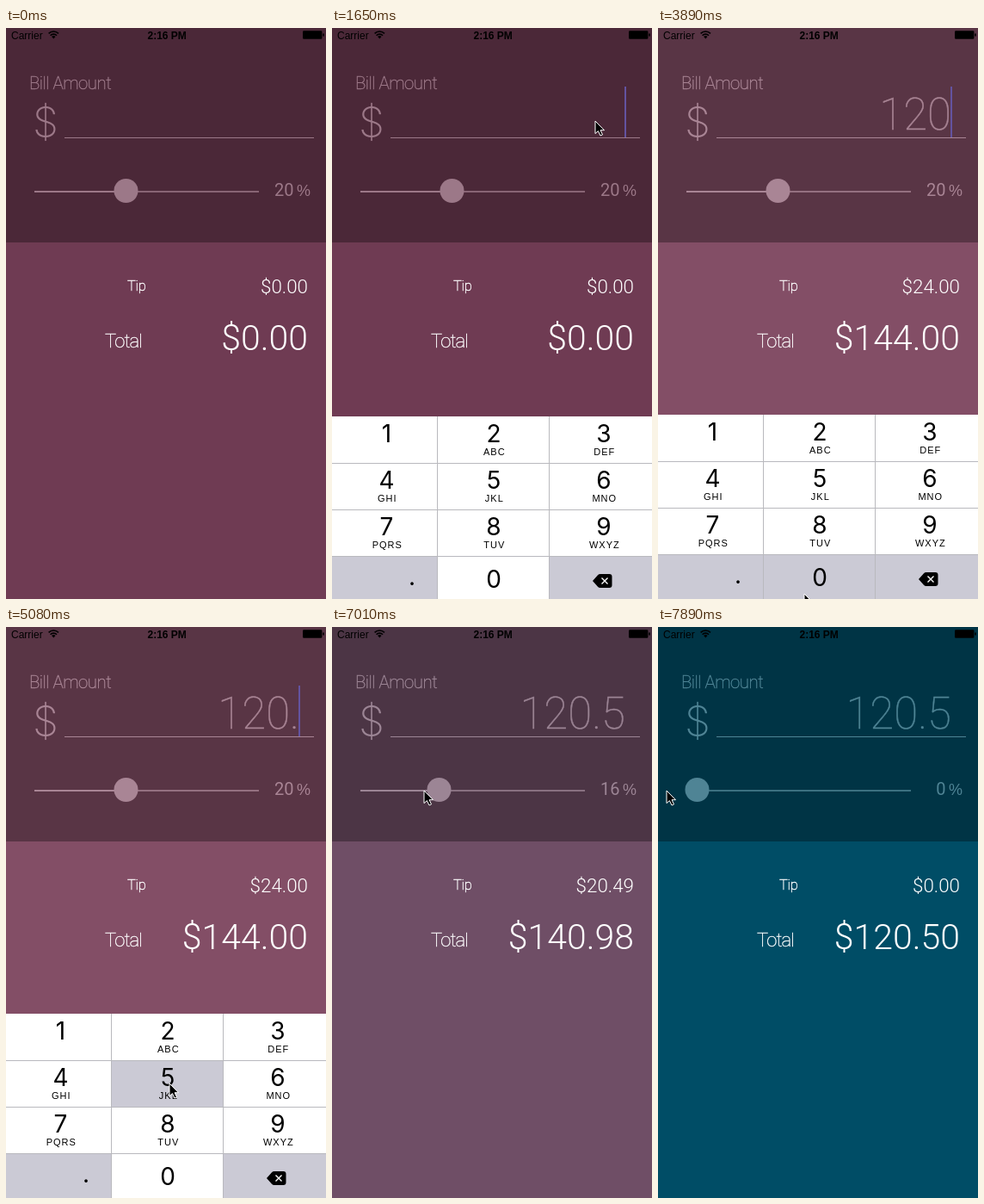
Recreate the animation shown at these times as an HTML page. Size 372 by 663 pixels, loop 8000 ms.

```html
<!DOCTYPE html>
<html lang="en">
<head>
<meta charset="utf-8">
<title>Tip calculator</title>
<style>
  html, body { margin: 0; width: 100%; height: 100%; overflow: hidden; }
  svg { display: block; }
  .back { fill: var(--back); }
  .panel { fill: var(--panel); }
  .soft { fill: var(--soft); }
  .thin, .light { font-family: Roboto, Inter, sans-serif; }
  .thin { font-weight: 100; stroke-width: .4; }
  .soft .thin { stroke: var(--soft); }
  .white .thin { stroke: #fff; }
  .light { font-weight: 300; }
  .white { fill: #fff; }
  .end { text-anchor: end; }
  .mid { text-anchor: middle; }
  .status { font: 12px "Liberation Sans", Arial, sans-serif; }
  .dollar { font: 200 48px Inter, Roboto, sans-serif; text-anchor: middle; }
  .digit { font: 28px Inter, Roboto, sans-serif; text-anchor: middle; }
  .abc { font: 11px "Liberation Sans", Arial, sans-serif; letter-spacing: 1px; text-anchor: middle; }
</style>
</head>
<body>
<svg id="stage" width="372" height="663" viewBox="0 0 372 663">
  <rect class="back" width="372" height="663"/>
  <rect class="panel" width="372" height="249"/>

  <g class="status">
    <text x="6" y="12.5">Carrier</text>
    <text x="187.2" y="12.5" class="mid" font-weight="bold">2:16 PM</text>
    <path d="M49.6 6.4a8 8 0 0 1 11.4 0M51.6 8.7a5.2 5.2 0 0 1 7.4 0" fill="none" stroke="#000" stroke-width="1.6"/>
    <path d="M55.3 12.6l-2.2-2.5a3.2 3.2 0 0 1 4.4 0z"/>
    <rect x="345" y="3.3" width="22.4" height="9.4" rx="1.2"/>
    <rect x="368.2" y="6.2" width="1.6" height="3.6" rx=".8"/>
  </g>

  <g class="soft">
    <text class="thin" x="27" y="71" font-size="20.5" letter-spacing="-.5">Bill Amount</text>
    <text class="dollar" x="46" y="126">$</text>
    <text class="thin end" id="bill" x="341" y="117.5" font-size="51"></text>
    <rect x="68" y="127" width="290" height="1"/>
    <rect x="33" y="189" width="261" height="2" opacity=".75"/>
    <rect id="fill" x="33" y="189" height="2"/>
    <circle id="thumb" cy="189" r="14"/>
    <text class="end" id="rate" x="334.5" y="195" font-size="20" font-family="Roboto, Inter, sans-serif"></text>
    <text x="338" y="194.5" font-size="18" font-family="'Liberation Sans', Arial, sans-serif">%</text>
  </g>
  <rect id="caret" x="340" y="68" width="2" height="59" fill="#6353a0"/>

  <g class="white">
    <text class="thin" x="141" y="305" font-size="16.5" letter-spacing="-.3">Tip</text>
    <text class="thin" x="115" y="371" font-size="22" letter-spacing="-.9">Total</text>
    <text class="light end" id="tip" x="351" y="307.5" font-size="22.4"></text>
    <text class="light end" id="total" x="351" y="374" font-size="41"></text>
  </g>

  <g id="pad"></g>

  <path id="pointer" d="M0 0V14.6L3.4 11.6 6 17 8.5 15.9 6.1 10.7H10.5Z"
        fill="#000" stroke="#fff" stroke-width="1" stroke-linejoin="round"/>
</svg>

<script>
const LOOP = 8000, TICK = 148.8;   // the screen refreshes once per tick
const PAD_TOP = 449, PAD_H = 216;
const SLIDE = 2.7;                 // keypad slide, in ticks
const $ = id => document.getElementById(id);
const set = (el, attrs) => { for (const k in attrs) el.setAttribute(k, attrs[k]); };

// all times below are in ticks
const typed = [[0, ''], [19, '1'], [22, '12'], [26, '120'], [31, '120.'], [35, '120.5']];
const presses = { 1: [17, 18], 2: [21, 21], 0: [26, 26], 5: [34, 34] };
const route = [
  [3, 325, 241], [4, 314, 150], [5, 301, 101], [6, 306, 108], [12, 306, 108],
  [16, 92, 477], [19, 92, 477], [21, 192, 478], [22, 192, 478], [23, 176, 643],
  [24, 170, 657], [27, 170, 657], [29, 95, 645], [31, 95, 645], [33, 190, 530],
  [35, 190, 530], [37, 73, 300], [38, 109, 298], [41, 109, 298], [45, 122, 190],
  [46, 122, 190], [49, 77, 190], [53, 10, 190]
];

function add(parent, tag, attrs, text) {
  const el = document.createElementNS('http://www.w3.org/2000/svg', tag);
  set(el, attrs);
  if (text) el.textContent = text;
  parent.append(el);
  return el;
}

const keys = {};
function buildPad() {
  const pad = $('pad'), left = [0, 123, 253], right = [122, 252, 372], mid = [63.5, 188, 316];
  const names = '1,2 ABC,3 DEF,4 GHI,5 JKL,6 MNO,7 PQRS,8 TUV,9 WXYZ,.,0,<'.split(',');
  add(pad, 'rect', { width: 372, height: PAD_H, fill: '#b9b9be' });
  names.forEach((name, i) => {
    const c = i % 3, r = (i - c) / 3, y = r * 54, [digit, abc] = name.split(' ');
    const dot = digit === '.', erase = digit === '<';
    keys[digit] = add(pad, 'rect', {
      x: left[c], y: y + (r ? 1 : 0), width: right[c] - left[c], height: r ? 53 : 54,
      fill: dot || erase ? '#cbcad5' : '#fff'
    });
    if (erase) return;
    add(pad, 'text', { class: 'digit', x: dot ? 93 : mid[c], y: y + (dot ? 34 : r === 3 ? 37 : 30) }, digit);
    if (abc) add(pad, 'text', { class: 'abc', x: mid[c] + 0.8, y: y + 45 }, abc);
  });
  add(pad, 'path', { d: 'M303 191L309 184.2Q310 183 312 183H322.5Q325.5 183 325.5 186V196Q325.5 199 322.5 199H312Q310 199 309 197.8Z' });
  add(pad, 'path', { d: 'M313.5 187.5l7 7m0-7l-7 7', stroke: '#fff', 'stroke-width': 1.4 });
}

const clamp = (v, lo, hi) => Math.min(hi, Math.max(lo, v));
const mix = (a, b, u) => a.map((v, i) => v + (b[i] - v) * u);
const rgb = c => `rgb(${c.map(Math.round)})`;
const slide = (n, from) => 1 - Math.pow(1 - clamp((n - from) / SLIDE, 0, 1), 2.25);

function along(n) {
  const i = route.findIndex(p => p[0] >= n);
  if (i < 0) return route[route.length - 1].slice(1);
  if (i === 0) return route[0].slice(1);
  const a = route[i - 1], b = route[i];
  return mix(a, b, (n - a[0]) / (b[0] - a[0])).slice(1);
}

function draw(n) {
  const [px, py] = along(n);
  set($('pointer'), { transform: `translate(${px} ${py})`, visibility: n < 3 ? 'hidden' : 'visible' });

  const thumb = n < 47 ? 139.5 : clamp(px + 17.5, 45.5, 139.5);
  const pct = (thumb - 45.5) / 4.7;
  const rate = Math.ceil(pct - 1e-6);
  set($('thumb'), { cx: thumb });
  set($('fill'), { width: thumb - 33 });
  $('rate').textContent = Math.floor(pct + 1e-6);

  const text = typed.filter(e => e[0] <= n).pop()[1];
  const bill = parseFloat(text) || 0;
  const tip = bill * rate;   // cents
  $('bill').textContent = text;
  $('tip').textContent = '$' + (Math.round(tip) / 100).toFixed(2);
  $('total').textContent = '$' + (Math.floor(bill * 100 + tip) / 100).toFixed(2);

  const warm = mix([111, 59, 83], [131, 78, 102], clamp((n - 18.5) / 4, 0, 1));
  const back = mix([0, 77, 102], warm, rate / 20);
  const style = $('stage').style;
  style.setProperty('--back', rgb(back));
  style.setProperty('--panel', rgb(mix(back, [0, 0, 0], .32)));
  style.setProperty('--soft', rgb(mix(back, [255, 255, 255], .31)));

  const blink = n === 14 || n === 15 || n === 37 || n === 38;
  set($('caret'), { visibility: n >= 9 && n < 40 && !blink ? 'visible' : 'hidden' });

  const hidden = 1 - slide(n, 8.64) + slide(n, 39.72);
  set($('pad'), { transform: `translate(0 ${Math.round(PAD_TOP + hidden * PAD_H)})` });
  for (const k in presses) {
    const [from, to] = presses[k];
    set(keys[k], { fill: n >= from && n <= to ? '#cbcad5' : '#fff' });
  }
}

function loop() {
  draw(Math.floor(performance.now() % LOOP / TICK));
  requestAnimationFrame(loop);
}

buildPad();
loop();
</script>
</body>
</html>
```
